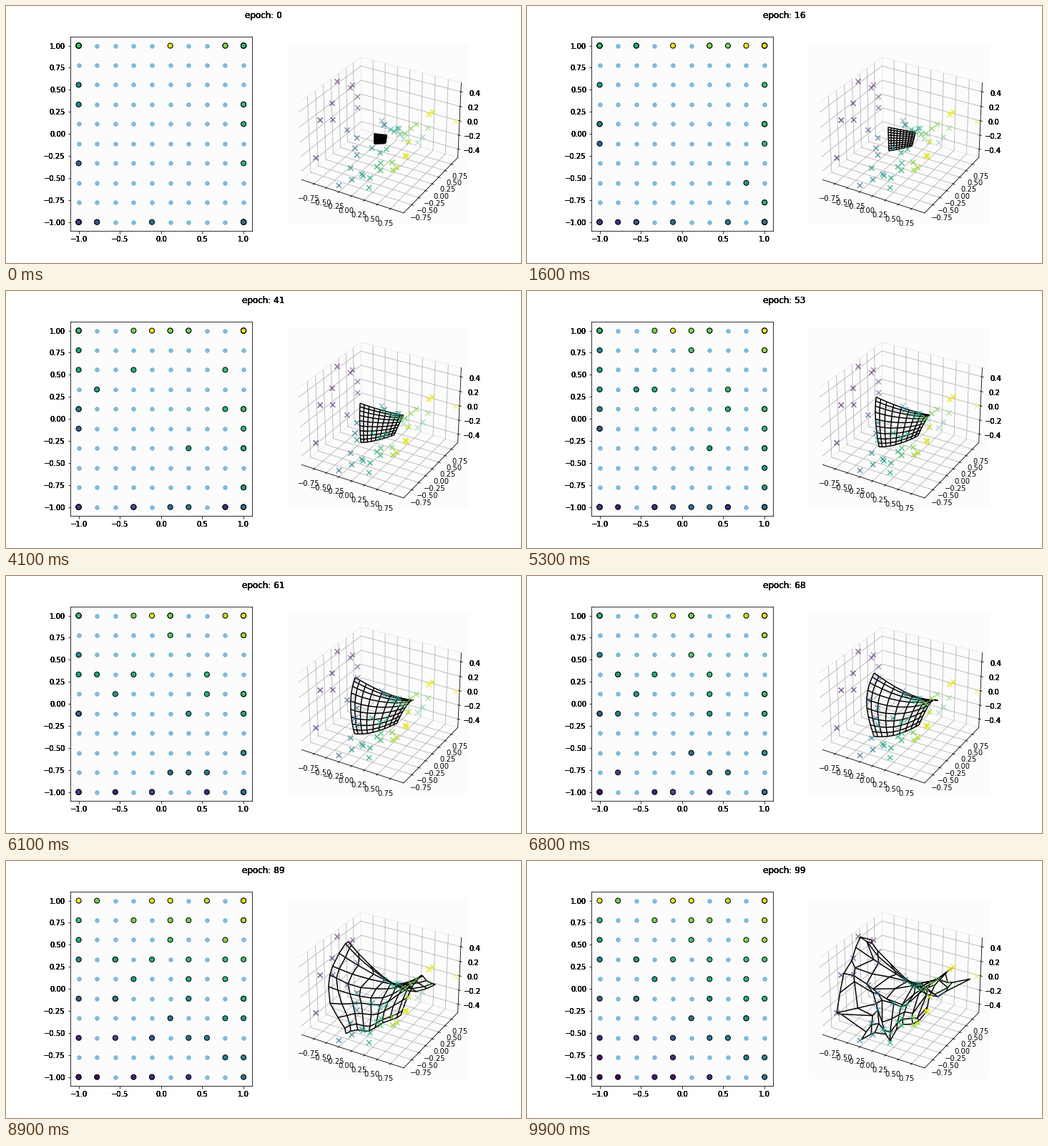
A matplotlib script that plays this animation: 720x360 px, repeating every 10 s.

```python
import numpy as np
import matplotlib.pyplot as plt
from matplotlib.animation import FuncAnimation
from mpl_toolkits.mplot3d.art3d import Line3DCollection

EPOCHS, SIDE, SAMPLES = 100, 10, 50
PAPER = "#fcfcfc"

# Random samples of a saddle
rng = np.random.RandomState(0)
x, y = 2 * rng.rand(2, SAMPLES) - 1
data = np.c_[x, y, (x ** 2 - y ** 2) / 2]

# Square lattice of the self-organising map
line = np.linspace(-1, 1, SIDE)
gx, gy = (a.ravel() for a in np.meshgrid(line, line))
nodes = np.c_[gx, gy]
cells = nodes * (SIDE - 1) / 2
cell_d2 = ((cells[:, None] - cells) ** 2).sum(2)


def winners(net):
    return ((data[:, None] - net) ** 2).sum(2).argmin(1)


def update(net, sigma):
    """One batch step: each node becomes a weighted mean of the samples."""
    d2 = cell_d2[:, winners(net)]
    h = np.exp((d2.min(1, keepdims=True) - d2) / (2 * sigma ** 2))
    return h @ data / h.sum(1, keepdims=True) if False else (
        h @ data / h.sum(1)[:, None])


def train(turn=np.radians(27)):
    c, s = np.cos(turn), np.sin(turn)
    net = np.c_[c * gy + s * gx, s * gy - c * gx, 0 * gx]
    for sigma in np.linspace(SIDE / np.sqrt(2), 0.5, EPOCHS):
        net = update(net, sigma)
        yield net


def wires(net):
    grid = net.reshape(SIDE, SIDE, 3)
    return list(grid) + list(grid.transpose(1, 0, 2))


def heavy(text, n=6):
    """Draw a text several times over for hard, dark edges."""
    draw = text.draw

    def repeat(renderer):
        for _ in range(n):
            draw(renderer)

    text.draw = repeat


def limits(values, margin=0.0):
    """Data range plus a margin and the small gap inside the box."""
    lo, hi = values.min(), values.max()
    half = (hi - lo) / 2 * (1 + 2 * margin) * 25 / 24
    return (lo + hi) / 2 - half, (lo + hi) / 2 + half


history = list(train())

plt.rcParams["figure.subplot.bottom"] = 0.125
fig = plt.figure(figsize=(10, 5), dpi=72, facecolor="white")
flat = fig.add_subplot(1, 2, 1, facecolor=PAPER)
space = fig.add_subplot(1, 2, 2, projection="3d", facecolor=PAPER,
                        computed_zorder=False)
title = fig.suptitle("epoch: 0")

# Lattice with the winning node of every sample
flat.scatter(gx, gy, s=30, color="#3a94cc", alpha=0.6)
hits = flat.scatter(*nodes[winners(history[0])].T, s=50, c=x, cmap="viridis",
                    edgecolors="black", linewidths=1)
flat.set_xticks(np.linspace(-1, 1, 5))
flat.set_yticks(np.linspace(-1, 1, 9))
flat.set(xlim=(-1.1, 1.1), ylim=(-1.1, 1.1))

# Net among the samples
mesh = Line3DCollection(wires(history[0]), colors="black", linewidths=1.5,
                        zorder=2)
space.add_collection3d(mesh)
space.scatter(*data.T, c=x, cmap="viridis", marker="x", s=50,
              linewidths=1.5, zorder=3)
space.set_xticks(np.linspace(-0.75, 0.75, 7))
space.set_yticks(np.linspace(-0.75, 0.75, 7))
space.set_zticks(np.linspace(-0.4, 0.4, 5))
space.set(xlim=limits(x), ylim=limits(y), zlim=limits(data[:, 2], 0.05))
for axis in (space.xaxis, space.yaxis, space.zaxis):
    axis.set_pane_color((0.92, 0.92, 0.92, 1))
    axis.pane.set_fill(False)

heavy(title)
for axis in (flat.xaxis, flat.yaxis, space.zaxis):
    for tick in axis.get_major_ticks():
        heavy(tick.label1)


def show(t):
    net = history[t]
    title.set_text(f"epoch: {t}")
    hits.set_offsets(nodes[winners(net)])
    mesh.set_segments(wires(net))
    return title, hits, mesh


anim = FuncAnimation(fig, show, frames=EPOCHS, interval=100, repeat=True,
                     repeat_delay=0, blit=False)
plt.show()
```
